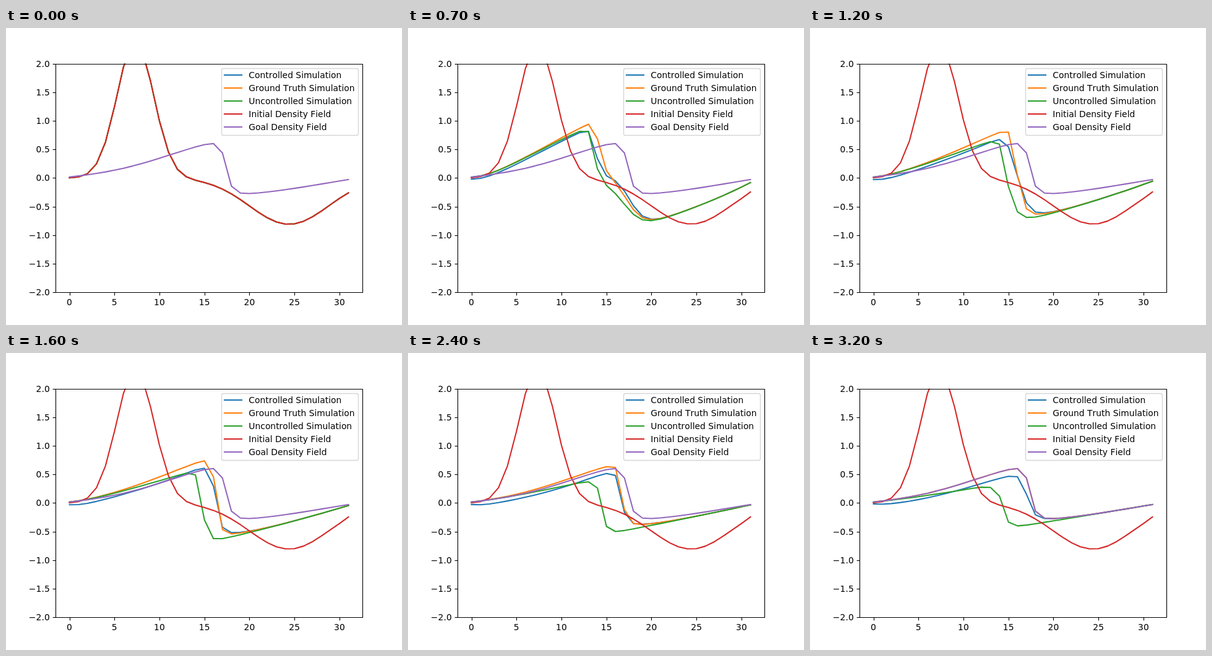
An HTML page with a canvas that plays this animation: 640 by 480 pixels, repeating every 3300 ms.

```html
<!DOCTYPE html>
<html lang="en">
<head>
<meta charset="utf-8">
<title>Density fields</title>
<style>
html, body { margin: 0; width: 100%; height: 100%; overflow: hidden; background: #fff; }
canvas { display: block; }
</style>
</head>
<body>
<canvas id="stage" width="640" height="480"></canvas>
<script>
const ctx = document.getElementById('stage').getContext('2d');
const CELLS = 32, STEPS = 32, STEP_MS = 100;
const DIFFUSION = 0.092, ADVECTION = 0.96;
const BOX = { left: 80, right: 576, top: 57.6, bottom: 427.2 };

const cells = f => Array.from({ length: CELLS }, (_, i) => f(i));
const bell = (x, mid, width) => Math.exp(-((x - mid) ** 2) / (2 * width ** 2));
const lerp = (a, b, k) => a + (b - a) * k;
const smooth = k => k * k * (3 - 2 * k);

// Burgers' equation: force, explicit diffusion, then semi-Lagrangian advection.
const cell = (u, i) => u[i] ?? 0;
function sample(u, x) {
  const i = Math.floor(x);
  return lerp(cell(u, i), cell(u, i + 1), x - i);
}
const diffuse = u => cells(i =>
  u[i] + DIFFUSION * (cell(u, i - 1) + cell(u, i + 1) - 2 * u[i]));
function simulate(start, force) {
  const states = [start];
  for (let n = 0; n < STEPS; n++) {
    const v = diffuse(states[n].map((u, i) => u + force(i, n / STEPS)));
    states.push(cells(i => sample(v, i - ADVECTION * v[i])));
  }
  return states;
}

// The controller first pushes ahead of the front, then spreads back behind it.
function control(i, progress) {
  const k = smooth(progress);
  const push = lerp(0.025, 0.017, k) * bell(i, lerp(17, 14, k), lerp(2.5, 4, k));
  const drag = 0.008 * (1 - k) * bell(i, 4, 7);
  return push - drag;
}

const initial = cells(i => 2.4 * bell(i, 7.32, 2.025) - 0.81 * bell(i, 24.4, 4.38));
const settled = diffuse(initial);
const uncontrolled = simulate(initial, () => 0);
const truth = simulate(initial, i => 0.0222 * bell(i, 13.6, 4));
const controlled = simulate(initial, control);

const series = [
  ['Controlled Simulation', '#1f77b4', n => controlled[n]],
  ['Ground Truth Simulation', '#ff7f0e', n => truth[n]],
  ['Uncontrolled Simulation', '#2ca02c', n => uncontrolled[n]],
  ['Initial Density Field', '#d62728', n => n ? settled : initial],
  ['Goal Density Field', '#9467bd', () => truth[STEPS]]];

const px = x => BOX.left + (x + 1.55) / 34.1 * (BOX.right - BOX.left);
const py = v => 242.4 - v * 92.4;
const crisp = v => Math.round(v) + 0.5;

function polyline(points, color, width) {
  ctx.beginPath();
  points.forEach(p => ctx.lineTo(...p));
  ctx.strokeStyle = color;
  ctx.lineWidth = width;
  ctx.stroke();
}
function label(text, x, y, align) {
  ctx.textAlign = align;
  ctx.fillStyle = '#000';
  ctx.fillText(text, x, y);
}

function drawAxes() {
  const left = crisp(BOX.left), bottom = crisp(BOX.bottom), top = crisp(BOX.top);
  ctx.lineCap = 'butt';
  ctx.letterSpacing = '0.16px';
  for (let x = 0; x <= 30; x += 5) {
    const tick = crisp(px(x));
    polyline([[tick, bottom], [tick, bottom + 4.9]], '#000', 1.11);
    label(String(x), px(x), 448, 'center');
  }
  for (let v = -2; v <= 2; v += 0.5) {
    const tick = crisp(py(v));
    polyline([[left, tick], [left - 4.9, tick]], '#000', 1.11);
    label(v.toFixed(1).replace('-', '\u2212'), 71, Math.round(py(v)) + 5, 'right');
  }
  ctx.letterSpacing = '0px';
  ctx.lineWidth = 1.11;
  ctx.strokeRect(left, top, crisp(BOX.right) - left, bottom - top);
}

function drawLegend() {
  ctx.beginPath();
  ctx.roundRect(348.5, 65.5, 221, 108, 2.8);
  ctx.fillStyle = 'rgba(255,255,255,0.8)';
  ctx.fill();
  ctx.strokeStyle = 'rgba(204,204,204,0.8)';
  ctx.lineWidth = 1.39;
  ctx.stroke();
  ctx.lineCap = 'square';
  series.forEach(([name, color], i) => {
    const y = 76 + 21 * i;
    polyline([[353, y], [381, y]], color, 2.08);
    label(name, 392.3, y + 5, 'left');
  });
}

function draw(n) {
  ctx.fillStyle = '#fff';
  ctx.fillRect(0, 0, 640, 480);
  ctx.font = '13.89px "DejaVu Sans", sans-serif';
  ctx.fontKerning = 'none';
  ctx.lineJoin = 'round';
  ctx.lineCap = 'square';
  ctx.save();
  ctx.beginPath();
  ctx.rect(BOX.left, BOX.top, BOX.right - BOX.left, BOX.bottom - BOX.top);
  ctx.clip();
  for (const [, color, field] of series)
    polyline(field(n).map((v, i) => [px(i), py(v)]), color, 2.08);
  ctx.restore();
  drawAxes();
  drawLegend();
}

const begin = performance.now();
function frame() {
  const elapsed = Math.max(0, performance.now() - begin);
  draw(Math.floor(elapsed / STEP_MS) % (STEPS + 1));
  requestAnimationFrame(frame);
}
frame();
</script>
</body>
</html>
```
